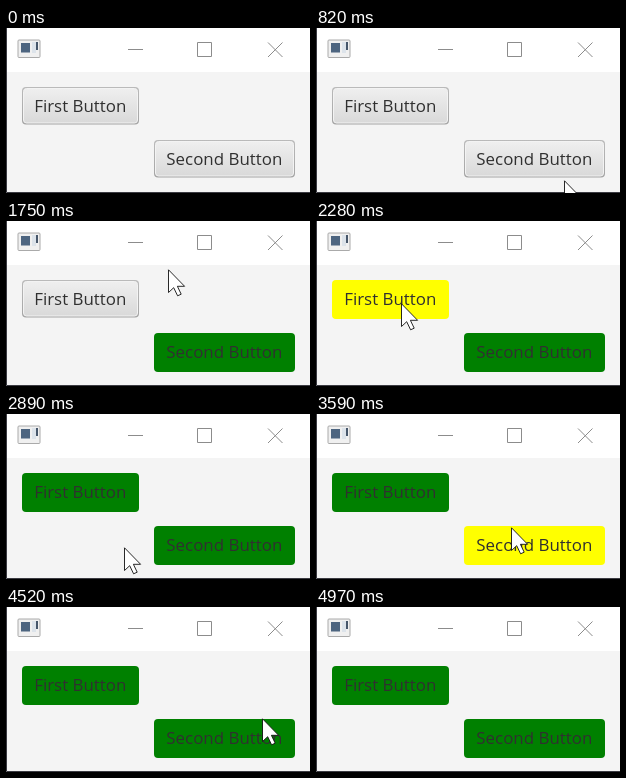
These frames come from a looping animation (304x165 px, 5610 ms). An HTML page:

```html
<!DOCTYPE html>
<html lang="en">
<head>
<meta charset="utf-8">
<title>Two buttons</title>
<style>
  html, body { margin: 0; width: 100%; height: 100%; overflow: hidden; background: #f4f4f4; }
  svg { display: block; width: 304px; height: 165px; }
  text { font: 16.9px "Open Sans", "Noto Sans", sans-serif; fill: #303030; }
  .flat { display: none; }
  .hover .flat, .left .flat { display: inline; }
  .hover .plain, .left .plain { display: none; }
  .left .flat { fill: #008000; }
  .hover .flat { fill: #ffff00; }
</style>
</head>
<body>
<svg viewBox="0 0 304 165">
  <defs>
    <linearGradient id="face" x2="0" y2="1">
      <stop offset="0" stop-color="#efefef"/>
      <stop offset="1" stop-color="#d9d9d9"/>
    </linearGradient>
    <linearGradient id="rim" x2="0" y2="1">
      <stop offset="0" stop-color="#bababa"/>
      <stop offset="1" stop-color="#a4a4a4"/>
    </linearGradient>
  </defs>

  <rect width="304" height="165" fill="#f4f4f4"/>
  <rect width="304" height="44" fill="#fff"/>
  <path d="M.5 0V164.5H304" fill="none" stroke="#3b3b42"/>

  <!-- title bar -->
  <rect x="12" y="12" width="22" height="17.5" rx="1" fill="#f0f0f0" stroke="#aaa"/>
  <rect x="15" y="15" width="9" height="9.5" fill="#4d6580"/>
  <rect x="26" y="14" width="4" height="11" fill="#dce3ea"/>
  <rect x="30" y="14" width="2" height="8" fill="#46566a"/>
  <path d="M122 21.5h15M191.5 14.5h14v14h-14zM262 14.5l14.5 14.5M276.5 14.5l-14.5 14.5" fill="none" stroke="#8c8c8c"/>

  <g id="buttons"></g>

  <path id="cursor" d="M.5.8V23.5L5.7 18.7 9.6 26.8 13.2 25.2 9.4 17.3H16.6Z"
        fill="#fff" stroke="#111" stroke-width=".9"/>
</svg>
<script>
const LOOP = 5610, START = 730, STEP = 76.9, LAST = 55;

// Key points of the pointer's path: step, x, y
const path = [
  [0, 250, 160], [6, 236, 110], [13, 162, 48], [18, 98, 66],
  [22, 83, 99], [28, 118, 133], [32, 154, 142], [37, 195, 113],
  [40, 217, 75], [47, 254, 81], [49, 256, 111], [LAST, 253, 168]
];

const buttons = [
  { label: "First Button", x: 16, y: 59, w: 117, h: 39 },
  { label: "Second Button", x: 148, y: 112, w: 141, h: 39 }
];

const pointAt = i => path[Math.max(0, Math.min(path.length - 1, i))];

function slope(i, axis) {
  const a = pointAt(i - 1), b = pointAt(i + 1);
  return (b[axis] - a[axis]) / (b[0] - a[0]);
}

// Smooth (cubic Hermite) curve through the key points
function tipAt(step) {
  const i = Math.max(1, path.findIndex(p => p[0] >= step));
  const a = path[i - 1], b = path[i];
  const span = b[0] - a[0], u = (step - a[0]) / span, v = 1 - u;
  return [1, 2].map(axis => Math.round(
    v * v * (1 + 2 * u) * a[axis] + u * u * (1 + 2 * v) * b[axis] +
    span * u * v * (v * slope(i - 1, axis) - u * slope(i, axis))));
}

// The button reacts one step after the pointer
function isHovered(b, step) {
  if (step < 1) return false;
  const [x, y] = tipAt(step - 1);
  return x >= b.x && x < b.x + b.w && y >= b.y && y < b.y + b.h;
}

const layer = document.getElementById("buttons");
layer.innerHTML = buttons.map(({ label, x, y, w, h }) => `
  <g transform="translate(${x} ${y})">
    <g class="plain">
      <rect width="${w}" height="${h - 1.5}" rx="4" fill="url(#rim)"/>
      <rect x="1.5" y="1.5" width="${w - 3}" height="${h - 4.5}" rx="3" fill="url(#face)" stroke="#f3f3f3"/>
    </g>
    <rect class="flat" width="${w}" height="${h}" rx="4"/>
    <text x="${w / 2 - .2}" y="25" text-anchor="middle">${label}</text>
  </g>`).join("");

buttons.forEach((b, i) => {
  b.node = layer.children[i];
  b.states = [];
  let seen = false;
  for (let s = 0; s <= LAST; s++) {
    const hover = isHovered(b, s);
    seen = seen || hover;
    b.states.push(hover ? "hover" : seen ? "left" : "");
  }
});

const cursor = document.getElementById("cursor");
const origin = performance.now();

function draw() {
  const time = (performance.now() - origin) % LOOP;
  const step = Math.min(LAST, Math.floor((time - START) / STEP));
  for (const b of buttons) b.node.setAttribute("class", b.states[step] || "");
  const shown = step >= 0 && step < LAST;
  cursor.style.display = shown ? "" : "none";
  if (shown) cursor.setAttribute("transform", `translate(${tipAt(step)})`);
  requestAnimationFrame(draw);
}
draw();
</script>
</body>
</html>
```
